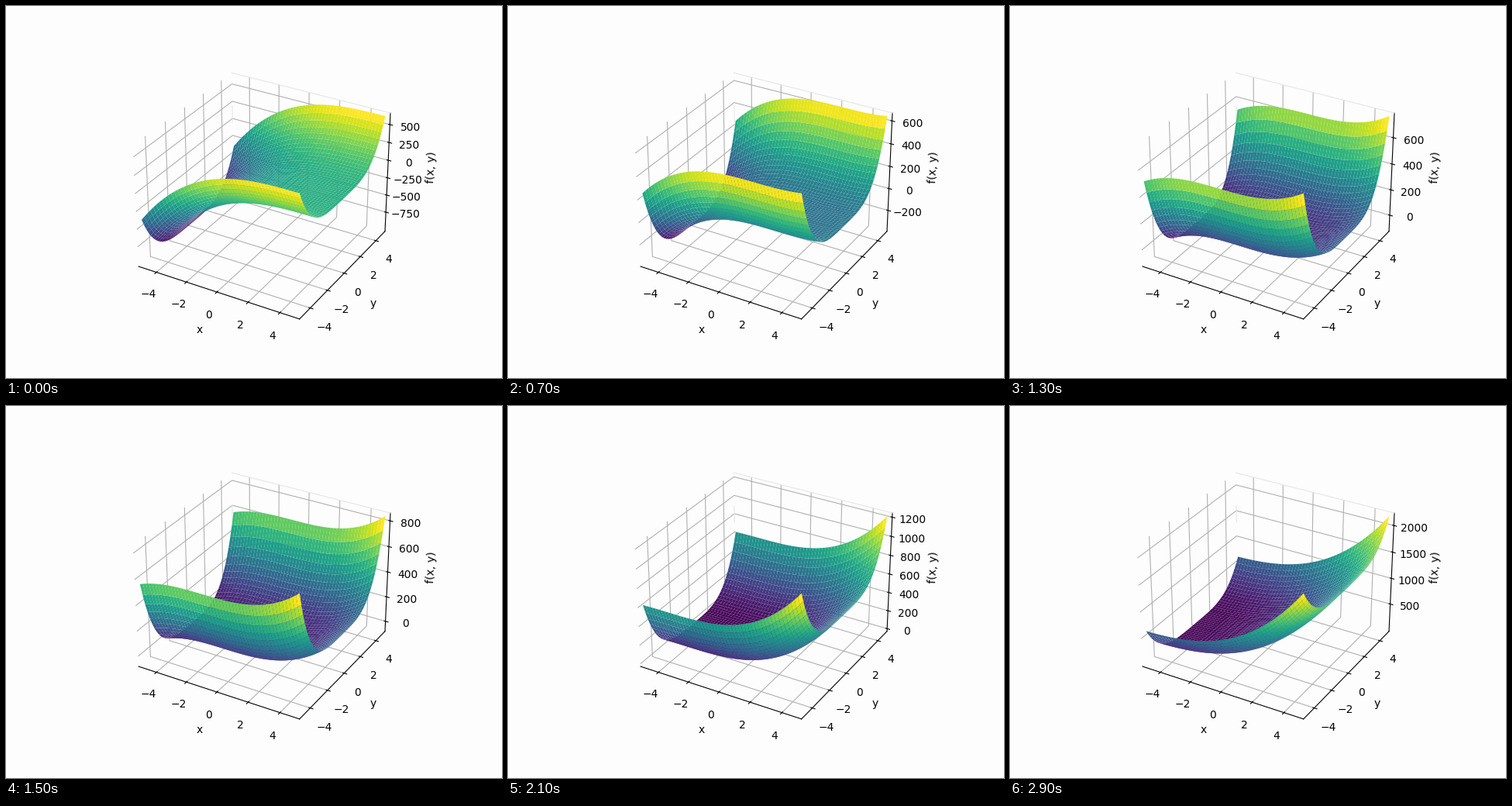
Animation of 640 by 480 pixels, one loop 3 s. Source, as a matplotlib script:

```python
import numpy as np
import matplotlib.pyplot as plt
from matplotlib.animation import FuncAnimation
from matplotlib.ticker import MaxNLocator

FRAMES = 30
INTERVAL = 100
HALF = 5
BG = "#fdfdfd"
EDGE = "#e6e6e6"

fig = plt.figure(figsize=(6.4, 4.8), dpi=100, facecolor=BG)
ax = fig.add_subplot(projection="3d", facecolor=BG)
for axis in (ax.xaxis, ax.yaxis, ax.zaxis):
    axis.set_pane_color(BG)


def padded(lo, hi):
    pad = (hi - lo) / 48
    return lo - pad, hi + pad


side = np.linspace(-HALF, HALF, 50)
X, Y = np.meshgrid(side, side)
left, right = padded(-HALF, HALF)
ticks = MaxNLocator(nbins=8, steps=[1, 2, 2.5, 5, 10])

ax.set_xlabel("x")
ax.set_ylabel("y")
ax.set_zlabel("f(x, y)")

# faint outline of the back wall
top_edge, = ax.plot([], [], [], color=EDGE, lw=0.8)
side_edge, = ax.plot([], [], [], color=EDGE, lw=0.8)
surface = None


def draw(i):
    global surface
    shift = -HALF + 0.4 * i
    Z = (X + shift) ** 3 + Y ** 4
    if surface is not None:
        surface.remove()
    surface = ax.plot_surface(X, Y, Z, cmap="viridis")

    lo, hi = Z.min(), Z.max()
    bottom, top = padded(lo, hi)
    ax.set_xlim(left, right)
    ax.set_ylim(left, right)
    ax.set_zlim(bottom, top)
    # only label values that the surface reaches
    ax.set_zticks([v for v in ticks.tick_values(lo, hi) if lo <= v <= hi])

    height = top - bottom
    top_edge.set_data_3d([left, right], [right, right], [top, top])
    side_edge.set_data_3d([left, left], [right, right],
                          [top - 0.28 * height, top - 0.42 * height])
    return surface, top_edge, side_edge


anim = FuncAnimation(fig, draw, frames=FRAMES, init_func=lambda: draw(0),
                     interval=INTERVAL, repeat=True, repeat_delay=0)
plt.show()
```
